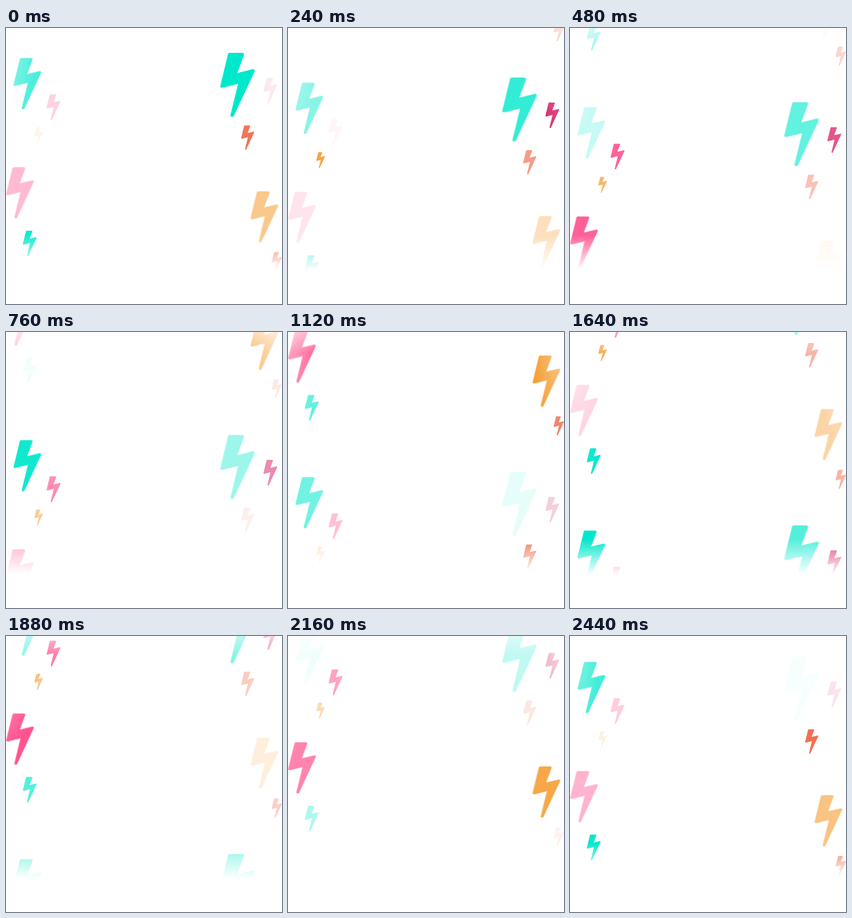
An HTML page that plays this animation: 400x400 px, repeating every 2480 ms.

```html
<!DOCTYPE html>
<html lang="en">
<head>
<meta charset="utf-8">
<title>Falling bolts</title>
<style>
  html, body { margin: 0; width: 100%; height: 100%; overflow: hidden; background: #fff; }
  svg {
    display: block; width: 400px; height: 400px;
    mask-image:
      linear-gradient(rgba(0,0,0,.55) 0, #000 30px, #000 300px, transparent 352px),
      radial-gradient(45px 170px at 0 0, rgba(0,0,0,.5), #000),
      radial-gradient(45px 170px at 100% 0, rgba(0,0,0,.5), #000);
    mask-composite: intersect;
  }
</style>
</head>
<body>
<svg viewBox="0 0 400 400">
  <defs>
    <!-- 896 units wide, 1664 high -->
    <path id="bolt" d="M885 438q18 20 7 44l-540 1157q-13 25-42 25-4 0-14-2-17-5-25.500-19t-4.500-30l197-808-406 101q-4 1-12 1-18 0-31-11-18-15-13-39l201-825q4-14 16-23t28-9h328q19 0 32 12.500t13 29.500q0 8-5 18l-171 463 396-98q8-2 12-2 19 0 34 15z"/>
  </defs>
</svg>
<script>
  const LOOP = 2480, STEP = 40, TILE = 369.3, UNITS = 1792;
  const TEAL = '#00e8cc', PINK = '#ff4a8a', ORANGE = '#f59c2f', RED = '#f0694a', CRIMSON = '#d6175e';

  // Each bolt lights up at its flash times and fades out until the next one.
  const bolts = [
    { x: 10.9, y: 43.5, size: 80, color: TEAL, flashes: [700, 1640, 2200] },
    { x: 58.9, y: 96.2, size: 40, color: PINK, flashes: [310, 1550] },
    { x: 41, y: 144.2, size: 25, color: ORANGE, flashes: [140, 1380] },
    { x: 0.3, y: 201.7, size: 80, color: PINK, flashes: [400, 1040, 1830] },
    { x: 24.4, y: 293.7, size: 40, color: TEAL, flashes: [820, 1597, 2424] },
    { x: 310.5, y: 36, size: 100, color: TEAL, flashes: [0, 1240] },
    { x: 373.1, y: 72.2, size: 40, color: CRIMSON, flashes: [140, 1380] },
    { x: 340.8, y: 141.2, size: 38, color: RED, flashes: [860, 2400] },
    { x: 354.4, y: 236.7, size: 80, color: ORANGE, flashes: [560, 1090, 2040] },
    { x: 385, y: 324.8, size: 30, color: RED, flashes: [1000, 2280] }
  ];

  const svg = document.querySelector('svg');

  function add(parent, tag, attrs) {
    const el = document.createElementNS('http://www.w3.org/2000/svg', tag);
    for (const key in attrs) el.setAttribute(key, attrs[key]);
    return parent.appendChild(el);
  }

  for (const b of bolts) {
    b.el = add(svg, 'g', { fill: b.color });
    for (const dy of [0, -TILE]) {
      add(b.el, 'use', { href: '#bolt', transform: `translate(0 ${dy}) scale(${b.size / UNITS})` });
    }
  }

  function glow(flashes, t) {
    const n = flashes.length;
    let i = n - 1;
    while (i >= 0 && flashes[i] > t) i--;
    const from = i < 0 ? flashes[n - 1] - LOOP : flashes[i];
    const to = i === n - 1 ? flashes[0] + LOOP : flashes[i + 1];
    return 1 - (t - from) / (to - from);
  }

  function draw() {
    const t = Math.floor(performance.now() % LOOP / STEP) * STEP;
    for (const b of bolts) {
      const y = (b.y + TILE * t / LOOP) % TILE;
      b.el.setAttribute('transform', `translate(${b.x} ${y.toFixed(2)})`);
      b.el.setAttribute('opacity', glow(b.flashes, t).toFixed(3));
    }
    requestAnimationFrame(draw);
  }
  draw();
</script>
</body>
</html>
```
